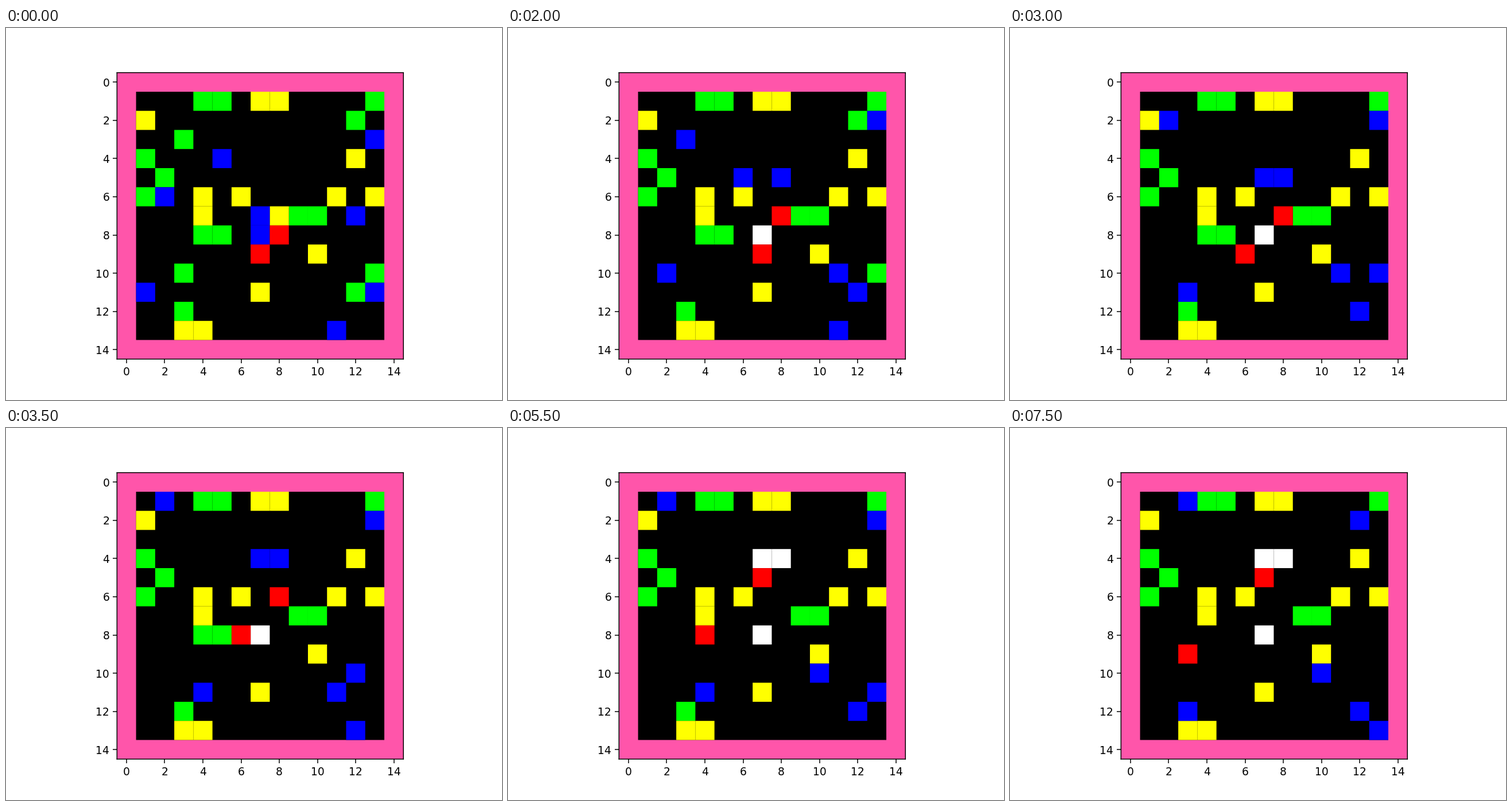
Animation of 864 by 648 pixels, one loop 8000 ms. Source, as a matplotlib script:

```python
from itertools import product

import matplotlib.pyplot as plt
from matplotlib.animation import FuncAnimation
from matplotlib.collections import PolyCollection
from matplotlib.patches import Rectangle

SIZE, FRAMES, INTERVAL = 15, 16, 500
PINK, YELLOW, GREEN = "#ff55aa", "#ffff00", "#00ff00"
BLUE, RED, WHITE = "#0000ff", "#ff0000", "#ffffff"

STEPS = {".": (0, 0), "h": (0, -1), "j": (1, 0), "k": (-1, 0), "l": (0, 1)}


def walk(row, col, moves=""):
    """Cell of a creature at every tick: one move per tick, then rest."""
    path = [(row, col)]
    for move in moves.ljust(FRAMES - 1, "."):
        dr, dc = STEPS[move]
        row, col = row + dr, col + dc
        path.append((row, col))
    return path


def plant():
    """Food at the start, as cell -> colour."""
    green = list(product((1, 8), (4, 5)))                            # pairs
    green += [(r + i, 13 - i) for r in (1, 10) for i in range(2)]    # diagonals
    green += [(r, 1 + r % 2) for r in range(4, 7)]                   # zigzag
    green += product((3, 10, 12), (3,))
    green += product((7,), (9, 10))

    yellow = [(6, c + d) for c in (4, 11) for d in (0, 2)]
    yellow += [(7, 4), (7, 8), (11, 7)]
    yellow += [(r, c + i) for r, c in ((1, 7), (13, 3)) for i in range(2)]
    yellow += [(2, 1), (4, 12), (9, 10)]
    return dict.fromkeys(green, GREEN) | dict.fromkeys(yellow, YELLOW)


FOOD = plant()
PREY = [
    walk(3, 13, "...khl.hl..j.kh"),
    walk(4, 5, "llhj.lk"),
    walk(6, 2, "lkkkkhk....l.hl"),
    walk(7, 7, "klk.lhk"),
    walk(8, 7),
    walk(7, 12, "hjjjjkjkkjhljkh"),
    walk(11, 1, "kllhjll" + "kj" * 2 + "khjj"),
    walk(11, 13, "hkj.klhjljkjhkj"),
    walk(13, 11, "khjlklj.hklj.l."),
]
HUNTERS = [
    walk(8, 8, "..k.hlkk.h"),
    walk(9, 7, ".lh.h.khh..lhjh"),
]


def beside(a, b):
    return abs(a[0] - b[0]) + abs(a[1] - b[1]) == 1


def caught(path, tick):
    """True once a hunter has stood beside the prey on an earlier tick."""
    return any(beside(path[t], h[t]) for t in range(tick) for h in HUNTERS)


def board(tick):
    """Coloured cells at a tick; a creature eats the food it steps on."""
    eaten = {cell for path in PREY + HUNTERS for cell in path[:tick + 1]}
    cells = {cell: color for cell, color in FOOD.items() if cell not in eaten}
    for path in PREY:
        cells[path[tick]] = WHITE if caught(path, tick) else BLUE
    for path in HUNTERS:
        cells[path[tick]] = RED
    return cells


def square(row, col):
    left, right, top, bottom = col - .5, col + .5, row - .5, row + .5
    return [(left, top), (right, top), (right, bottom), (left, bottom)]


plt.rcParams["path.snap"] = False  # keep cell edges at their true position
fig, ax = plt.subplots(figsize=(6.4, 4.8), dpi=135)
ax.set(xlim=(-.5, SIZE - .5), ylim=(SIZE - .5, -.5), aspect="equal",
       facecolor=PINK)
ax.add_patch(Rectangle((.5, .5), SIZE - 2, SIZE - 2, facecolor="black", lw=0))
tiles = ax.add_collection(PolyCollection([], linewidths=0), autolim=False)


def update(tick):
    cells = board(tick)
    tiles.set_verts([square(*cell) for cell in cells])
    tiles.set_facecolor(list(cells.values()))
    return (tiles,)


anim = FuncAnimation(fig, update, frames=FRAMES, interval=INTERVAL,
                     repeat=True, repeat_delay=0)
plt.show()
```
